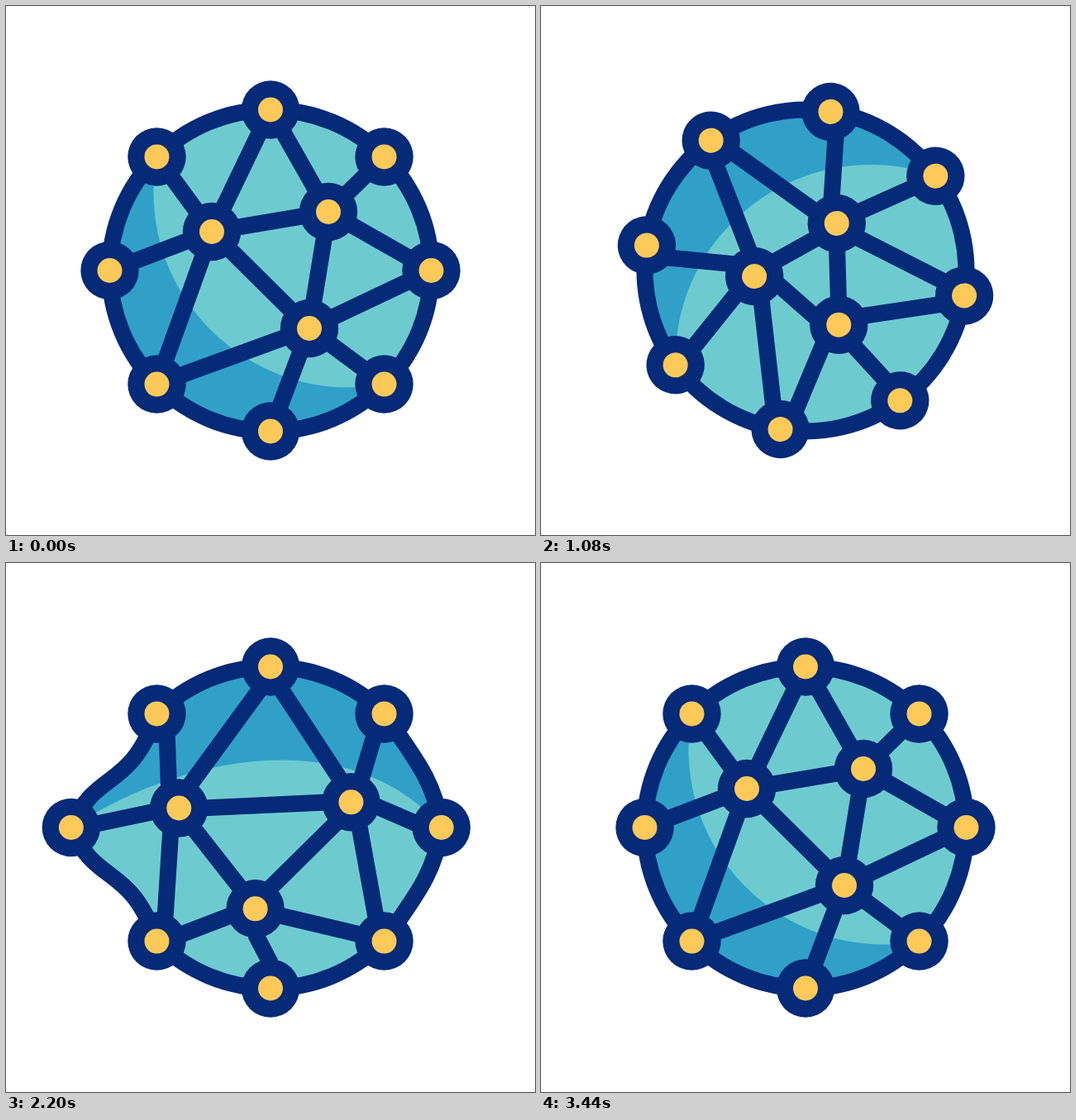
Animation of 640x640 px, one loop 3.6 s. Source, as an HTML page with a canvas:

```html
<!DOCTYPE html>
<html lang="en">
<head>
<meta charset="utf-8">
<title>Network globe</title>
<style>
html, body { margin: 0; width: 100%; height: 100%; overflow: hidden; background: #fff; }
canvas { display: block; }
</style>
</head>
<body>
<canvas id="stage" width="640" height="640"></canvas>
<script>
const ctx = document.getElementById('stage').getContext('2d');
const NAVY = '#042a78', YELLOW = '#fdc958', LIGHT = '#6dcbcf', DARK = '#30a0c9';
const LOOP = 3600, STEP = 20, R = 194.5, RAD = Math.PI / 180;

// Key times shared by every moving part
const KEYS = [200, 827, 1540, 2085, 2720, 3400];
const UL = 7, LR = 3;
const bumps = { [UL]: [0, 0, 0, 0, 67.5, 0], [LR]: [0, 0, 0, 57, 0, 0] };

// Inner nodes: rest position, offsets at the key times, linked rim nodes (0 = top, clockwise)
const inner = [
  { home: [-71, -47], dx: [0, 24.5, -20, -20, -18, 0], dy: [0, 24.5, 8, 8, -37.2, 0], rim: [0, 7, 6, 5] },
  { home: [70, -71], dx: [0, -24.5, 12.5, 12.5, 12.5, 0], dy: [0, 24.5, 14.5, 14.5, 14.5, 0], rim: [0, 1, 2] },
  { home: [47, 70], dx: [0, -29.5, -32, 25, -32, 0], dy: [0, -29, 24.5, 25, 24.5, 0], rim: [2, 3, 4, 5] }
];

function track(values, t) {
  if (t <= KEYS[0]) return values[0];
  const i = KEYS.findIndex(k => t < k);
  if (i < 0) return values[values.length - 1];
  const f = (t - KEYS[i - 1]) / (KEYS[i] - KEYS[i - 1]);
  return values[i - 1] + (values[i] - values[i - 1]) * f;
}

// Point at a tangential and a radial distance along rim direction i
function polar(i, along, out) {
  const s = Math.sin(i * 45 * RAD), c = Math.cos(i * 45 * RAD);
  return [out * s + along * c, along * s - out * c];
}

const rimHome = Array.from({ length: 8 }, (_, i) => polar(i, 0, R));

function outline(rim, bump) {
  const path = new Path2D();
  path.moveTo(...rim[0]);
  for (let i = 0; i < 8; i++) {
    const j = (i + 1) % 8;
    const k = bump[i] ? i : j, side = k === i ? 1 : -1, f = bump[k] / 47;
    const handles = [
      polar(k, side * (51.5 + 20.5 * f), R + 16.5 * f),
      polar(k, side * (101 - 59 * f), 174 - 3 * f)
    ];
    if (side < 0) handles.reverse();
    path.bezierCurveTo(...handles[0], ...handles[1], ...rim[j]);
  }
  path.closePath();
  return path;
}

// Lit side: everything to the upper right of a curve between the stretchable rim nodes
function lightSide(rim, bump) {
  const bulge = i => 136 - 0.95 * bump[i];
  ctx.beginPath();
  ctx.moveTo(...rim[UL]);
  ctx.bezierCurveTo(...polar(UL, -bulge(UL), 100.5), ...polar(LR, bulge(LR), 100.5), ...rim[LR]);
  ctx.lineTo(...polar(LR, -300, 300));
  ctx.lineTo(...polar(UL, 300, 300));
  ctx.fillStyle = LIGHT;
  ctx.fill();
}

// Each end keeps its resting offset from the node it follows
function link(p, q, pHome, qHome) {
  const dx = qHome[0] - pHome[0], dy = qHome[1] - pHome[1];
  const k = 30 / Math.hypot(dx, dy);
  ctx.moveTo(p[0] + dx * k, p[1] + dy * k);
  ctx.lineTo(q[0] - dx * k, q[1] - dy * k);
}

function disc(x, y, r, color) {
  ctx.fillStyle = color;
  ctx.beginPath();
  ctx.arc(x, y, r, 0, 2 * Math.PI);
  ctx.fill();
}

function draw(t) {
  const angle = Math.max(0, 180 - Math.abs(t - 1800) * 0.1125);
  const bump = rimHome.map((_, i) => bumps[i] ? track(bumps[i], t) : 0);
  const rim = bump.map((d, i) => polar(i, 0, R + d));
  const core = inner.map(n => [n.home[0] + track(n.dx, t), n.home[1] + track(n.dy, t)]);
  const shell = outline(rim, bump);

  ctx.setTransform(1, 0, 0, 1, 0, 0);
  ctx.fillStyle = '#fff';
  ctx.fillRect(0, 0, 640, 640);
  ctx.translate(320, 320);
  ctx.rotate(angle * RAD);

  ctx.fillStyle = DARK;
  ctx.fill(shell);
  ctx.save();
  ctx.clip(shell);
  lightSide(rim, bump);
  ctx.restore();

  ctx.strokeStyle = NAVY;
  ctx.lineWidth = 20;
  ctx.lineJoin = 'round';
  ctx.stroke(shell);
  ctx.beginPath();
  inner.forEach((n, i) => {
    const next = (i + 1) % 3;
    for (const k of n.rim) link(core[i], rim[k], n.home, rimHome[k]);
    link(core[i], core[next], n.home, inner[next].home);
  });
  ctx.stroke();

  for (const [x, y] of [...rim, ...core]) {
    disc(x, y, 35.2, NAVY);
    disc(x, y, 15, YELLOW);
  }
}

const start = performance.now();
function tick() {
  const t = (performance.now() - start) % LOOP;
  draw(Math.floor(t / STEP) * STEP);
  requestAnimationFrame(tick);
}
tick();
</script>
</body>
</html>
```
